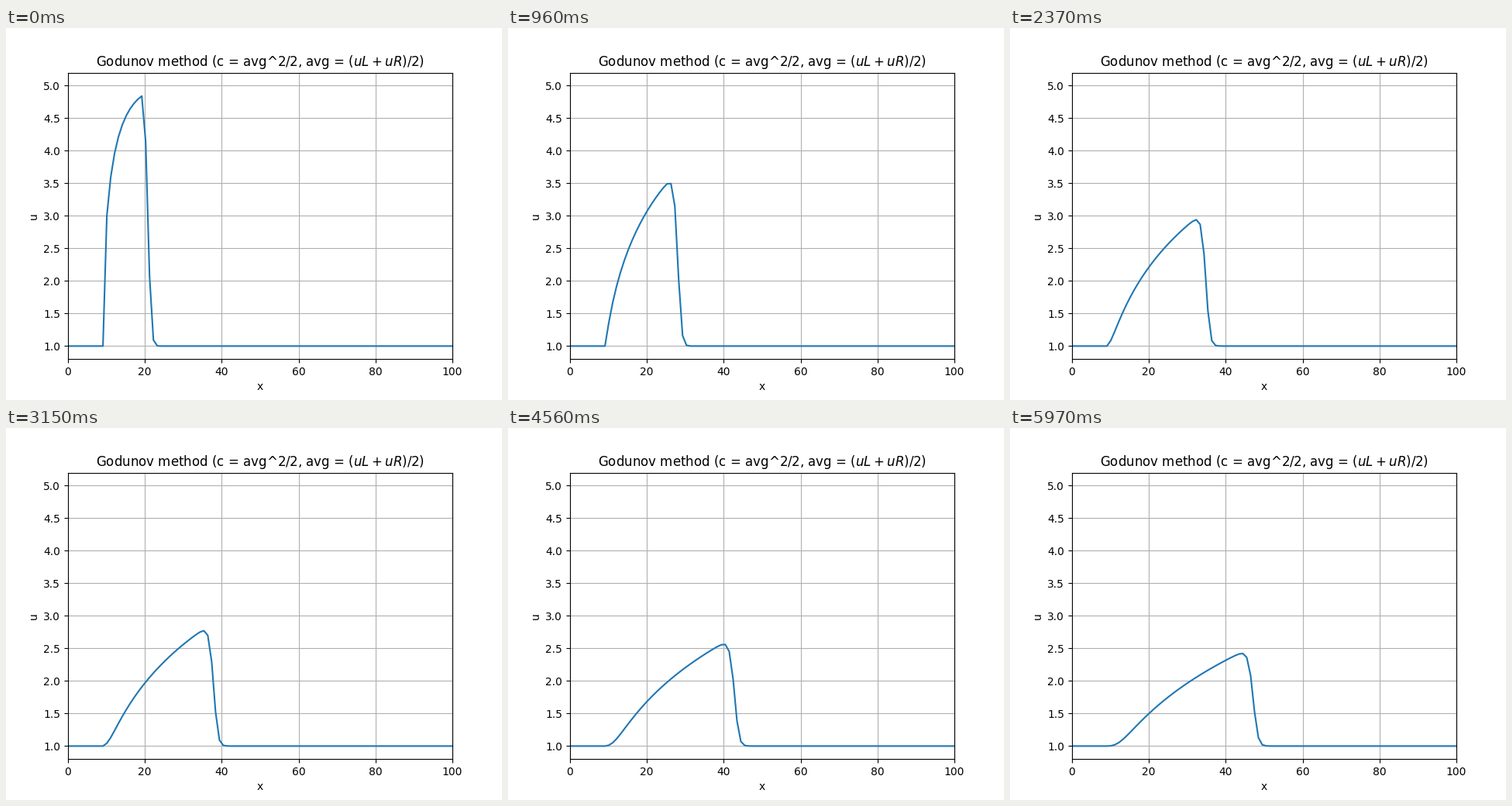
A matplotlib script that plays this animation: 640 by 480 pixels, repeating every 6 s.

```python
import numpy as np
import matplotlib.pyplot as plt
from matplotlib.animation import FuncAnimation

FRAMES = 200
INTERVAL = 30
N = 100
RATIO = 0.05   # dt / dx
WARMUP = 4     # steps taken before the first picture


def step(u):
    """Advance one time step, sweeping in place from left to right."""
    for i in range(1, N):
        avg = (u[i - 1] + u[i]) / 2
        c = avg ** 2 / 2
        u[i] -= RATIO * c * (u[i] - u[i - 1])


def solve():
    u = [1.0] * N
    u[10:20] = [5.0] * 10
    for _ in range(WARMUP):
        step(u)
    states = []
    for _ in range(FRAMES):
        states.append(u.copy())
        step(u)
    return np.array(states)


x = np.linspace(0, 100, N)
states = solve()

fig, ax = plt.subplots(figsize=(6.4, 4.8), dpi=100)
line, = ax.plot(x, states[0])
ax.set_xlim(0, 100)
ax.set_ylim(0.8, 5.2)
ax.set_xlabel("x")
ax.set_ylabel("u")
ax.set_title("Godunov method (c = avg^2/2, avg = ($uL + uR$)/2)")
ax.grid(True)


def update(k):
    line.set_ydata(states[k])
    return line,


anim = FuncAnimation(fig, update, frames=FRAMES, interval=INTERVAL,
                     repeat=True, repeat_delay=0)
plt.show()
```
